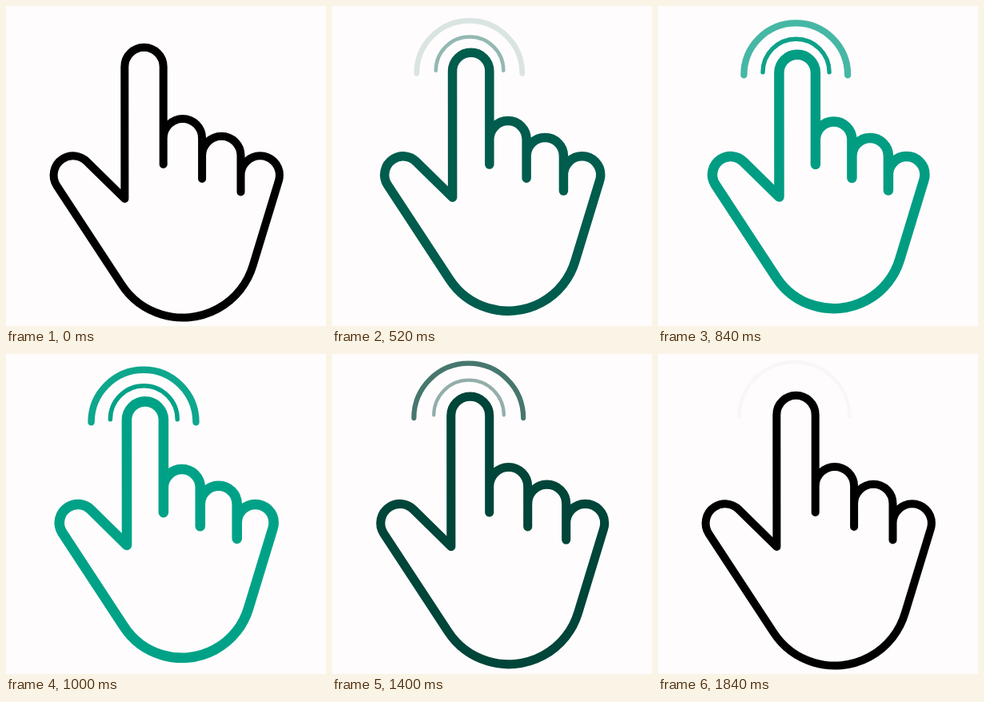
These frames come from a looping animation (400x400 px, 2.16 s). An HTML page with a canvas:

```html
<!DOCTYPE html>
<html>
<head>
<meta charset="utf-8">
<title>Tap</title>
<style>
  html, body { margin: 0; width: 100%; height: 100%; overflow: hidden; background: #fffcfd; }
  canvas { display: block; width: 100%; height: 100%; }
</style>
</head>
<body>
<canvas id="stage" width="400" height="400"></canvas>
<script>
const ctx = document.getElementById('stage').getContext('2d');
const LOOP = 2160, STEP = 40, LAST = 1840;
const PI = Math.PI, R = 24.2;

// Sine-eased rise from start to peak, then fall back to 0 at end.
function pulse(t, start, peak, end) {
  const x = t < peak ? (t - start) / (peak - start) : (end - t) / (end - peak);
  return (1 - Math.cos(PI * Math.min(1, Math.max(0, x)))) / 2;
}

const hand = new Path2D();
function finger(x, y, bottom) {
  hand.arc(x, y, R, PI, 0);
  hand.lineTo(x + R, bottom);
  hand.moveTo(x + R, y);
}
hand.moveTo(148.4, 241);
finger(172.5, 76, 198);
hand.moveTo(196.7, 165.2);
finger(220.9, 165.2, 216);
hand.moveTo(245.1, 187);
finger(269.3, 187, 232.5);
hand.moveTo(293.5, 211.5);
hand.arc(317.7, 211.5, R, PI, 0.29);
hand.arc(221, 298, 91.5, 0.29, 2.565);      // palm
hand.arc(83.8, 211.5, R, 2.565, 1.75 * PI); // thumb
hand.lineTo(148.4, 241);

function ring(x, y, r) {
  const path = new Path2D();
  path.arc(x, y, r, PI, 0);
  return path;
}
const inner = ring(170.8, 75.3, 44.2);
const outer = ring(170.5, 79, 69);

function draw(t) {
  const scale = 1 - 0.06 * pulse(t, 0, 800, 1600);
  const tint = pulse(t, 0, 960, 1760);

  function stroke(path, width, alpha) {
    ctx.globalAlpha = alpha;
    ctx.lineWidth = width / scale;
    ctx.stroke(path);
  }

  ctx.setTransform(1, 0, 0, 1, 0, 0);
  ctx.clearRect(0, 0, 400, 400);
  ctx.translate(200, 200);
  ctx.scale(scale, scale);
  ctx.translate(-200, -200);
  ctx.lineCap = ctx.lineJoin = 'round';
  ctx.strokeStyle = `rgb(0, ${Math.round(163 * tint)}, ${Math.round(136 * tint)})`;
  stroke(outer, 4.5 + 4 * tint, pulse(t, 320, 1120, 1920));
  stroke(inner, 3.3 + 2.2 * tint, pulse(t, 160, 960, 1760));
  stroke(hand, 10 + 2.6 * tint, 1);
}

const begin = performance.now();
function tick() {
  const t = (performance.now() - begin) % LOOP;
  draw(Math.min(LAST, Math.floor(t / STEP) * STEP));
  requestAnimationFrame(tick);
}
tick();
</script>
</body>
</html>
```
